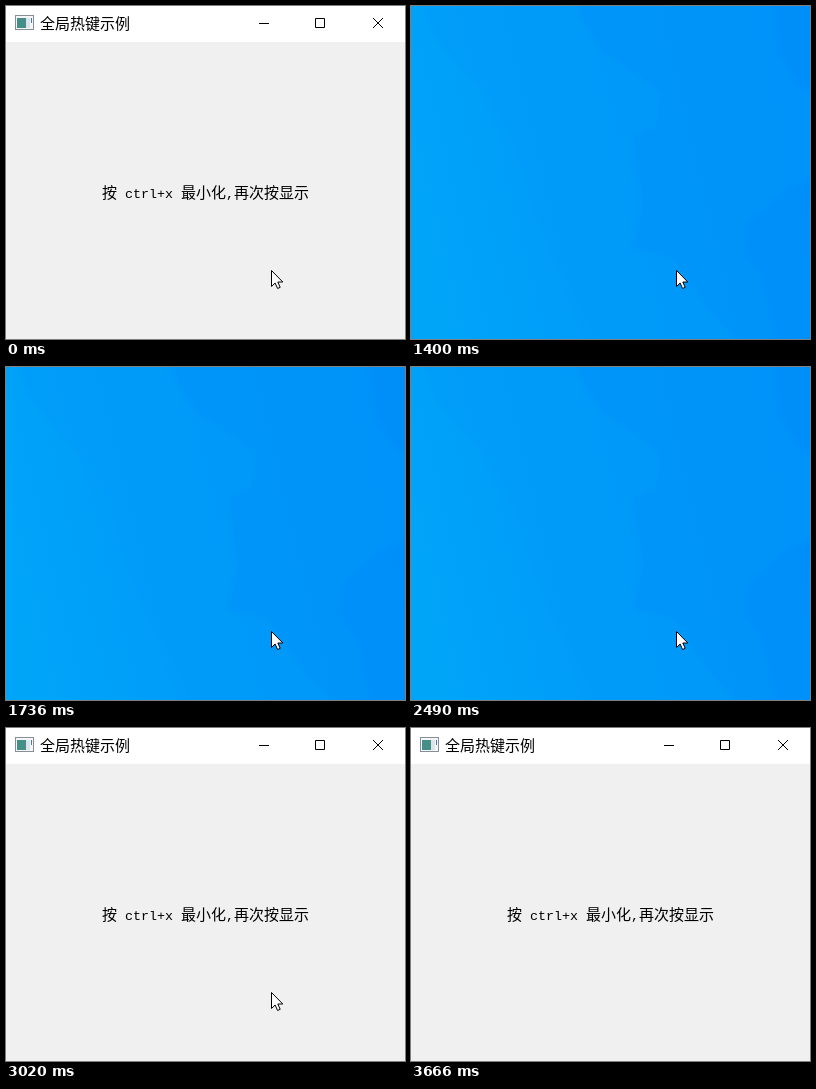
Animation of 399 by 333 pixels, one loop 3.89 s. Source, as an HTML page:

```html
<!DOCTYPE html>
<html lang="zh-CN">
<head>
<meta charset="utf-8">
<title>全局热键示例</title>
<style>
  html, body { margin: 0; width: 100%; height: 100%; overflow: hidden; }
  svg { display: block; }
  text { font-family: "Noto Sans CJK SC", "Noto Sans CJK", sans-serif; font-size: 15px; white-space: pre; }
  .latin { font-family: "Liberation Mono", monospace; font-size: 13.33px; }
</style>
</head>
<body>
<svg width="399" height="333" viewBox="0 0 399 333">
  <defs>
    <linearGradient id="sky" x1="0" y1=".6" x2="1" y2=".4">
      <stop offset="0" stop-color="#00a5f8"/>
      <stop offset=".35" stop-color="#009cf9"/>
      <stop offset=".7" stop-color="#0094fa"/>
      <stop offset="1" stop-color="#008cf9"/>
    </linearGradient>
    <filter id="soft" x="-20%" y="-20%" width="140%" height="140%">
      <feGaussianBlur stdDeviation="2"/>
    </filter>
  </defs>

  <g id="desktop">
    <rect width="399" height="333" fill="url(#sky)"/>
    <g filter="url(#soft)" fill-opacity=".6">
      <path fill="#009bf9" d="M10-20 22 30 75 90 105 150 122 205 150 270 190 350H430V-20Z"/>
      <path fill="#0093fa" d="M160-20 172 15 190 45 235 75 250 90 245 122 222 130 232 200 222 242 262 252 295 300 340 350H430V-20Z"/>
      <path fill="#008cf8" d="M360-20 368 50 390 85H430V-20ZM430 155 372 185 338 215 332 245 352 275 368 350H430Z"/>
    </g>
  </g>

  <g id="window">
    <rect width="399" height="333" fill="#f0f0f0"/>
    <rect width="399" height="36" fill="#fff"/>
    <g shape-rendering="crispEdges">
      <rect x="9" y="9" width="19" height="15" fill="#868e96"/>
      <rect x="10" y="10" width="17" height="13" fill="#f4f6f8"/>
      <rect x="11" y="12" width="9" height="10" fill="#468f89"/>
      <rect x="20" y="12" width="4" height="10" fill="#dce3ea"/>
      <rect x="25" y="12" width="1" height="5" fill="#4c78b0"/>
    </g>
    <text x="34" y="23">全局热键示例</text>
    <g fill="none" stroke="#000">
      <path d="M253 17.5h10M309.5 12.5h9v9h-9z"/>
      <path d="M367 12l10 10M377 12l-10 10"/>
    </g>
    <text x="96" y="192" font-weight="300">按<tspan class="latin"> ctrl+x </tspan>最小化<tspan class="latin">,</tspan>再次按显示</text>
  </g>

  <path id="cursor" fill="#fff" stroke="#000" d="M265.5 264.5v16l3.6-3.5 2.5 5.5 2.6-1.2-2.4-5.3h5z"/>
</svg>
<script>
  const LOOP = 3890;
  const toggles = [1400, 1960, 2490, 3020];
  const cursorOff = 3330;
  const show = (id, on) =>
    document.getElementById(id).setAttribute("visibility", on ? "visible" : "hidden");

  function draw() {
    const t = performance.now() % LOOP;
    show("window", toggles.filter(x => x <= t).length % 2 === 0);
    show("cursor", t < cursorOff);
    requestAnimationFrame(draw);
  }
  draw();
</script>
</body>
</html>
```
